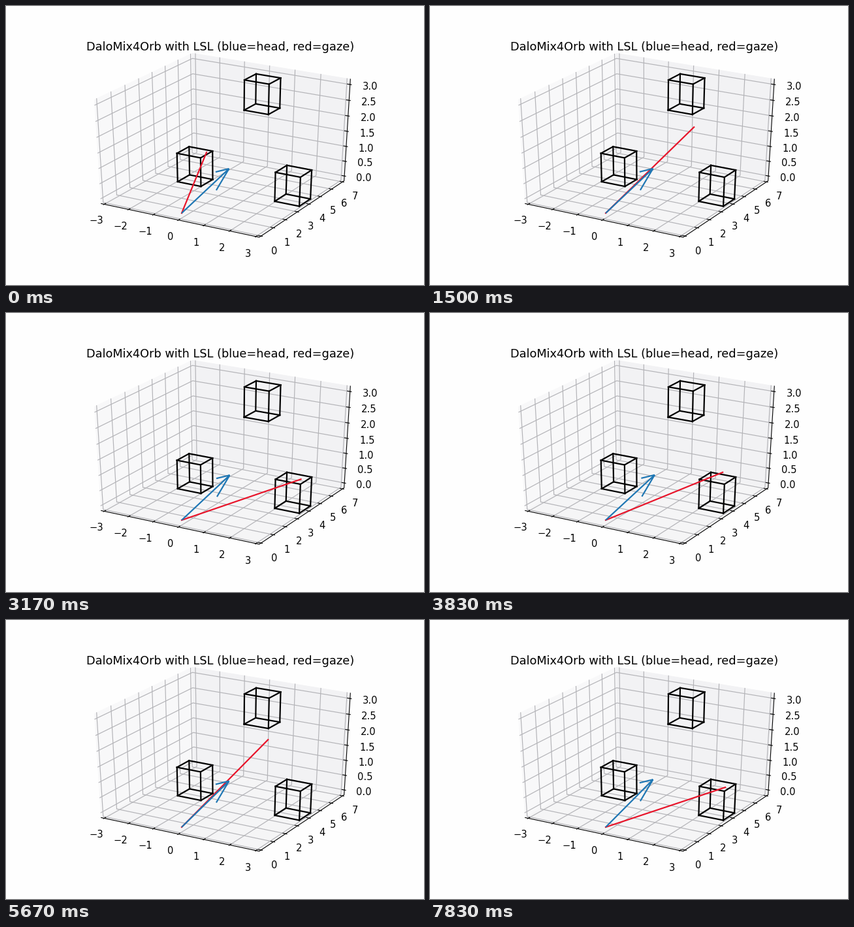
Write a matplotlib script that moves like this. It is 640 px wide and 427 px high and loops after 8 s.

```python
import itertools

import matplotlib.pyplot as plt
import numpy as np
from matplotlib.animation import FuncAnimation

W, H, DPI = 640, 427, 128
PX = 72 / DPI                      # points per pixel
TICK, LOOP = 40, 8000              # ms
RATE = 6                           # poses per second

PAPER, GRID = "#fefefe", "#b4b4b8"
WALLS = ["#f8f8f9", "#f2f2f4", "#f5f5f6"]
RED, BLUE = "#e8142a", "#1f77b4"
EDGE = 0.5 + 1 / 48                # walls sit just outside the axis limits
STEP = 1 / 12
LABEL_GAP = 0.086

# Perspective camera: elevation 30, azimuth -60, distance 10
ELEV, AZIM, DIST = np.radians(30), np.radians(-60), 10
EYE = np.array([np.cos(ELEV) * np.cos(AZIM),
                np.cos(ELEV) * np.sin(AZIM), np.sin(ELEV)])
RIGHT = np.array([-np.sin(AZIM), np.cos(AZIM), 0])
UP = np.cross(EYE, RIGHT)
CENTER = np.array([334.7, 208.1])
SCALE = np.array([2681, -1743])

# The gaze rests near each cube in turn: start in the cycle, point, drift
CYCLE, LEAD, JUMP = 29 / 6, 0.58, 0.15
STOPS = [(0, (307, 224), (0, 0)),
         (1.18, (401, 183), (12, 9)),
         (2.93, (453, 259), (-8, -25))]
ORIGIN = np.array([269, 317])
BARBS = np.array([(-20.5, 5), (-19.5, 33)])


def project(points):
    """Unit-box coordinates to pixels."""
    p = np.atleast_2d(np.asarray(points, float))
    depth = DIST - p @ EYE
    flat = np.column_stack([p @ RIGHT, p @ UP]) / depth[:, None]
    return CENTER + flat * SCALE


def unit(x, y, z):
    """Data values to unit-box coordinates."""
    return np.array([x / 6, y / 7 - 0.5, (z - 1.5) / 3.2])


def stroke(points, color, width, z):
    ax.plot(*project(points).T, color=color, lw=width * PX, zorder=z)


def label(point, text):
    x, y = project(point)[0]
    ax.text(x, y - 1.5, text, size=14.8 * PX, ha="center", va="top")


def tick(point, axis):
    a, b = np.array(point, float), np.array(point, float)
    out = np.sign(a[axis])
    a[axis] += 0.1 * STEP * out
    b[axis] -= 0.2 * STEP * out
    stroke([a, b], "black", 1.1, 4)


def draw_box():
    e = EDGE
    panes = [
        [(-e, -e, -e), (-e, e, -e), (-e, e, e), (-e, -e, e)],
        [(-e, e, -e), (e, e, -e), (e, e, e), (-e, e, e)],
        [(-e, -e, -e), (e, -e, -e), (e, e, -e), (-e, e, -e)],
    ]
    for pane, color in zip(panes, WALLS):
        ax.fill(*project(pane).T, color=color, lw=0.8 * PX, zorder=1)

    far = e + LABEL_GAP
    for v in range(-3, 4):
        x = unit(v, 0, 0)[0]
        stroke([(x, -e, -e), (x, e, -e), (x, e, e)], GRID, 1.2, 2)
        tick((x, -e, -e), 1)
        label((x, -far, -far), str(v).replace("-", "\u2212"))
    for v in range(8):
        y = unit(0, v, 0)[1]
        stroke([(e, y, -e), (-e, y, -e), (-e, y, e)], GRID, 1.2, 2)
        tick((e, y, -e), 0)
        label((far, y, -far), str(v))
    for v in np.arange(0, 3.1, 0.5):
        z = unit(0, 0, v)[2]
        stroke([(-e, -e, z), (-e, e, z), (e, e, z)], GRID, 1.2, 2)
        tick((e, e, z), 0)
        label((far, far, z), f"{v:.1f}")

    stroke([(-e, -e, -e), (e, -e, -e), (e, e, -e), (e, e, e)],
           "black", 1.1, 4)


def draw_cube(center, side=0.955):
    corners = itertools.product((-0.5, 0.5), repeat=3)
    for a, b in itertools.combinations(corners, 2):
        if sum(i != j for i, j in zip(a, b)) == 1:
            ends = [unit(*(center + side * np.array(c))) for c in (a, b)]
            stroke(ends, "black", 2.2, 5)


def rest(i, s):
    """Gaze point at stop i, s seconds after arriving there."""
    start, point, drift = STOPS[i]
    end = STOPS[i + 1][0] if i + 1 < len(STOPS) else CYCLE
    return np.array(point) + np.array(drift) * (s / (end - start)) ** 2, end


def gaze_end(t):
    s = (t + LEAD) % CYCLE
    i = max(k for k, stop in enumerate(STOPS) if stop[0] <= s)
    s -= STOPS[i][0]
    here, _ = rest(i, s)
    j = (i - 1) % len(STOPS)
    _, end = rest(j, 0)
    before, _ = rest(j, end - STOPS[j][0])
    u = min(s / JUMP, 1)
    return before + (here - before) * u * u * (3 - 2 * u)


def head_end(t):
    sway = 2.5 * np.exp(-((t - 3.8) / 0.7) ** 2)
    return np.array([341.4 + sway, 249 - 5 * (t / 8) ** 2])


plt.rcParams["font.family"] = "DejaVu Sans"
fig = plt.figure(figsize=(W / DPI, H / DPI), dpi=DPI, facecolor=PAPER)
ax = fig.add_axes([0, 0, 1, 1])
ax.set(xlim=(0, W), ylim=(H, 0))
ax.axis("off")

draw_box()
for center in [(-1.2, 3.5, 0.5), (0.5, 5.5, 2.67), (2.7, 3.5, 0.5)]:
    draw_cube(np.array(center))
ax.text(328, 68, "DaloMix4Orb with LSL (blue=head, red=gaze)",
        size=17.78 * PX, ha="center", va="baseline")

gaze, = ax.plot([], [], color=RED, lw=2.2 * PX, zorder=6)
head, = ax.plot([], [], color=BLUE, lw=2.2 * PX, zorder=7,
                solid_capstyle="butt")


def update(frame):
    # hold each pose for a sixth of a second
    t = (frame + 1) * TICK * RATE // 1000 / RATE
    t %= LOOP / 1000
    gaze.set_data(*np.array([ORIGIN, gaze_end(t)]).T)
    tip = head_end(t)
    gap = (np.nan, np.nan)
    parts = [ORIGIN, tip, gap, tip + BARBS[0], tip, gap, tip + BARBS[1], tip]
    head.set_data(*np.array(parts).T)
    return gaze, head


anim = FuncAnimation(fig, update, frames=LOOP // TICK, interval=TICK,
                     repeat=True, repeat_delay=0)
plt.show()
```
